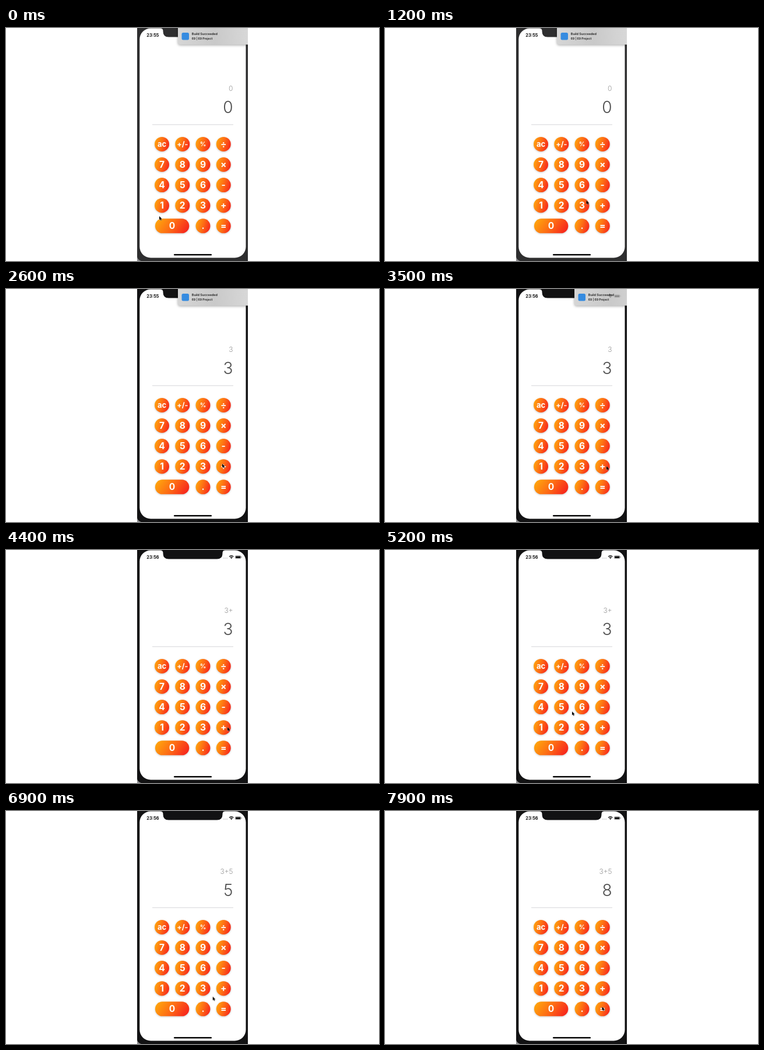
Animation, 640 px wide and 400 px high, one loop 8 s. Source, as an HTML page:

```html
<!DOCTYPE html>
<html lang="en">
<head>
<meta charset="utf-8">
<title>Calculator</title>
<style>
html, body { margin: 0; width: 100%; height: 100%; overflow: hidden; background: #fff; }
svg { display: block; width: 640px; height: 400px; font-family: Inter, Roboto, sans-serif; }
.key text { font-weight: 700; fill: #fff; text-anchor: middle; }
.key .shape { fill: url(#fire); filter: drop-shadow(0 1.5px 1.5px rgba(0,0,0,.22)); }
.clock { font-size: 7.4px; font-weight: 700; fill: #111; }
.expr { font-size: 12px; font-weight: 300; fill: #999; text-anchor: end; }
.result { font-size: 28px; font-weight: 300; fill: #4c4c4c; text-anchor: end; }
.note text { font-weight: 600; fill: #1c1c1c; }

/* one shared 8 s timeline */
.bezel, .note, .icons, .cursor { animation: 8s linear infinite; }
.step, .down { animation: 8s step-end infinite; }
.bezel { fill: #2e2e2f; animation-name: focus; animation-timing-function: step-end; }
.note { animation-name: leave; }
.icons { animation-name: reveal; }
.cursor { animation-name: point; animation-timing-function: ease-in-out; }
.down { animation-name: press; animation-delay: calc(var(--at) * 1ms - 8s); }

@keyframes focus { 0% { fill: #2e2e2f } 24.9% { fill: #121213 } }
@keyframes leave {
  0%, 42.2% { transform: translateX(0); animation-timing-function: ease-in }
  43.7% { transform: translateX(28px) }
  47%, 100% { transform: translateX(135px) }
}
@keyframes reveal { 0%, 42.2% { opacity: 0 } 43.7% { opacity: .32 } 47%, 100% { opacity: 1 } }
@keyframes point {
  0%, 4% { transform: translate(263px, 323px) }
  14%, 27.5% { transform: translate(345.5px, 296px) }
  32%, 36% { transform: translate(371px, 300px) }
  41%, 56.5% { transform: translate(380px, 304px) }
  69%, 79.5% { transform: translate(305px, 270px) }
  90%, 100% { transform: translate(372.5px, 336px) }
}
@keyframes press { 0% { visibility: visible } 3.75%, 100% { visibility: hidden } }
</style>
</head>
<body>
<svg viewBox="0 0 640 400">
  <defs>
    <linearGradient id="fire" x1="0" y1=".35" x2="1" y2=".65">
      <stop offset="0" stop-color="#ffa30d"/>
      <stop offset=".5" stop-color="#fd6a15"/>
      <stop offset="1" stop-color="#f7261c"/>
    </linearGradient>
    <linearGradient id="glass">
      <stop offset="0" stop-color="#d6d6d6"/>
      <stop offset=".5" stop-color="#c9c9c9"/>
      <stop offset="1" stop-color="#d9d9d9"/>
    </linearGradient>
    <clipPath id="stage"><rect x="225" width="190" height="400"/></clipPath>
  </defs>

  <g clip-path="url(#stage)">
    <rect class="bezel" x="225" width="190" height="400"/>
    <path d="M225 393Q226 398 232 400H225Z" fill="#8b8b8e"/>
    <rect x="229.3" y=".5" width="182.2" height="394" rx="19" fill="#fff"/>
    <path class="bezel" d="M265 0Q269.500 1 269.500 5V6Q269.500 15.500 279 15.500H362Q371.500 15.500 371.500 6V5Q371.500 1 376 0Z"/>
    <g id="display"></g>
    <path d="M251 165.800H390" stroke="#dedee0" stroke-width="1.300"/>
    <g id="keys"></g>
    <rect x="288" y="388" width="65" height="2.600" rx="1.300" fill="#080808"/>

    <g class="note">
      <rect x="295" y="-6" width="126" height="34.500" rx="4" fill="url(#glass)"
            style="filter:drop-shadow(0 1px 2px rgba(0,0,0,.35))"/>
      <rect x="301.500" y="8" width="12.500" height="12.500" rx="2.500" fill="#358be0"/>
      <text x="318.800" y="12" font-size="5.450">Build Succeeded</text>
      <text x="318.800" y="20" font-size="5">69 | 69 Project</text>
    </g>
    <g class="icons" fill="#111">
      <path d="M372.500 14H380.500" stroke="#aaa" stroke-width="1.200" stroke-dasharray="1.200 1"/>
      <g fill="none" stroke="#111" stroke-width="1.300">
        <path d="M383 11.400Q386.700 8.200 390.400 11.400"/>
        <path d="M384.600 13Q386.700 11.200 388.800 13"/>
      </g>
      <circle cx="386.700" cy="14.200" r=".9"/>
      <rect x="393.200" y="9.700" width="10" height="5" rx="1.400" fill="none" stroke="#777" stroke-width=".6"/>
      <rect x="394" y="10.500" width="8.400" height="3.400" rx=".7"/>
      <rect x="403.800" y="11.300" width=".8" height="1.800" rx=".4" fill="#777"/>
    </g>
    <path class="cursor" d="M0 0V6.400L1.500 5.100L2.600 7.600L3.800 7.100L2.800 4.700H4.700Z"
          fill="#000" stroke="#fff" stroke-width=".5" paint-order="stroke"/>
  </g>
</svg>
<script>
const LOOP = 8000;
const make = (parent, tag, attrs, text = "") => {
  const el = document.createElementNS("http://www.w3.org/2000/svg", tag);
  for (const name in attrs) el.setAttribute(name, attrs[name]);
  el.textContent = text;
  return parent.appendChild(el);
};

// Readouts: each value lasts until the next one starts
const sheet = document.head.appendChild(document.createElement("style"));
const display = document.getElementById("display");
function readout(cls, x, y, values) {
  values.forEach(([start, text], i) => {
    const end = i + 1 < values.length ? values[i + 1][0] : LOOP;
    const name = cls + i;
    const pct = ms => ms / LOOP * 100 + "%";
    const before = start ? "0% { visibility: hidden }" : "";
    const after = end < LOOP ? `${pct(end)}, 100% { visibility: hidden }` : "100% { visibility: visible }";
    sheet.textContent += `@keyframes ${name} { ${before} ${pct(start)} { visibility: visible } ${after} }\n`;
    make(display, "text", { class: cls + " step", x, y, style: "animation-name:" + name }, text);
  });
}
readout("clock", 241.3, 15, [[0, "23:55"], [2900, "23:56"]]);
readout("expr", 389.5, 107.5, [[0, "0"], [2200, "3"], [4000, "3+"], [6200, "3+5"]]);
readout("result", 389.5, 145.5, [[0, "0"], [2200, "3"], [6200, "5"], [7700, "8"]]);

// Keypad
const rows = ["ac +/- % ÷", "7 8 9 ×", "4 5 6 -", "1 2 3 +", "0 _ . ="];
const sizes = { ac: 13, "+/-": 12.5, "%": 10.5 };
const presses = { 3: 1900, "+": 3700, 5: 5900, "=": 7400 };
const keys = document.getElementById("keys");
rows.forEach((row, r) => row.split(" ").forEach((label, c) => {
  if (label === "_") return;
  const wide = label === "0";
  const w = wide ? 58.5 : 25;
  const x = wide ? 285.1 : 267.5 + c * 35.25;
  const y = 199.4 + r * 35.1;
  const size = sizes[label] || 15.5;
  const box = { x: x - w / 2, y: y - 12.5, width: w, height: 25, rx: 12.5 };
  const caption = { x, y: y + size * 0.36, "font-size": size };
  const key = make(keys, "g", { class: "key" });
  make(key, "rect", { class: "shape", ...box });
  make(key, "text", caption, label);
  if (!(label in presses)) return;
  const down = make(key, "g", { class: "down", style: "--at:" + presses[label] });
  make(down, "circle", { cx: x + 1.2, cy: y + 1.2, r: 12.4, fill: "#fff", stroke: "#444", "stroke-width": 0.8 });
  make(down, "circle", { cx: x, cy: y, r: 12.5, fill: "#53322a" });
  make(down, "text", { ...caption, style: "fill:#8d8582" }, label);
}));
</script>
</body>
</html>
```
